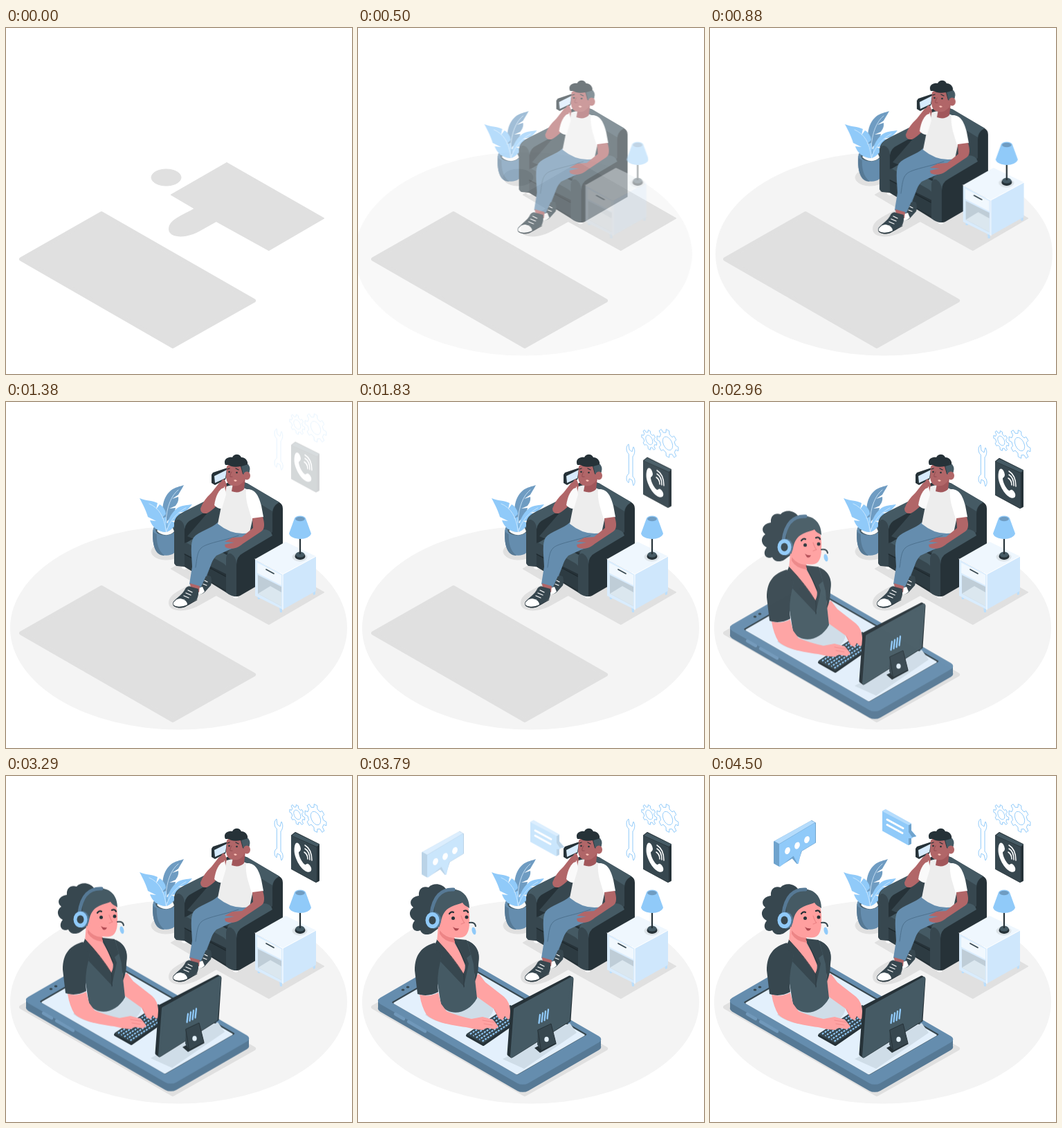
Write an HTML page that moves like this. It is 500 px wide and 500 px high and loops after 4.54 s.

```html
<!DOCTYPE html>
<html lang="en">
<head>
<meta charset="utf-8">
<title>Remote support</title>
<style>
html,body{margin:0;width:100%;height:100%;overflow:hidden;background:#fff}
svg{display:block;width:100vw;height:100vh}
.room,.signs,.agent,.chat{animation:4540ms infinite both}
.room{animation-name:room}
.signs{animation-name:signs}
.agent{animation-name:agent}
.chat{animation-name:chat}
.hold{animation:hold 4540ms step-end infinite}
@keyframes hold{0%{opacity:0}2.8%,100%{opacity:1}}
@keyframes room{
0%{opacity:0;transform:translateX(-30px);animation-timing-function:cubic-bezier(.36,-.01,.5,1.38)}
24.34%,100%{opacity:1;transform:none}}
@keyframes signs{
0%,24.34%{opacity:0;transform:translateY(-30px);animation-timing-function:cubic-bezier(.36,-.01,.5,1.38)}
49.3%,100%{opacity:1;transform:none}}
@keyframes agent{
0%,49.2%{opacity:0;transform:translateY(30px);animation-timing-function:cubic-bezier(.36,-.01,.5,1.38)}
74.2%,100%{opacity:1;transform:none}}
@keyframes chat{
0%,74.2%{opacity:0;transform:translateY(30px);animation-timing-function:cubic-bezier(.36,-.01,.5,1.38)}
99.2%,100%{opacity:1;transform:none}}
.ln{fill:none;stroke-linecap:round;stroke-linejoin:round}
.rd{stroke-linejoin:round}
</style>
</head>
<body>
<svg viewBox="0 0 500 500">
<g class="hold"><g class="room"><ellipse cx="249.5" cy="326.5" rx="243.5" ry="147" fill="#f4f4f4"/></g></g>

<!-- floor shadows -->
<g fill="#e0e0e0" stroke="#e0e0e0" class="rd">
<path stroke-width="6" d="M22 334 138 268 358 394 241 460Z"/>
<path stroke-width="2" d="M319 195 459 275 380 321 304 279 279 293C267 300 252 302 243 299 234 296 234 287 241 280 250 272 262 268 273 261L239 241Z"/>
<ellipse cx="231.5" cy="216" rx="21.500" ry="12"/>
</g>

<g class="hold"><g class="room">
<!-- plant -->
<path d="M212.5 185C211 201 214 213 219 218 225 223 238 223 243 218 248 212 249 199 248 185Z" fill="#658dae"/>
<path d="M212.5 185C211 201 214 213 219 218 222 221 226 222 229 222 219 214 217 201 218 188Z" fill="#567995"/>
<ellipse cx="230.300" cy="184.500" rx="17.800" ry="9.500" fill="#658dae"/>
<ellipse cx="230.300" cy="185" rx="14" ry="7.500" fill="#455a64"/>
<path d="M218 186 224 182 241 182 243 187C238 194 224 194 218 186Z" fill="#fafafa"/>
<path d="M230 186C223 160 225 139 238 128 244 123 252 122 257 120 254 126 251 130 249 134L240 140 249 137C250 143 247 147 245 150L236 154 245 153C244 160 239 167 233 172Z" fill="#6f9cc2"/>
<path d="M232 188C232 174 237 161 248 153 254 149 262 149 269 148 265 153 262 156 259 158L249 160 257 162C255 167 250 170 247 171L239 172 245 175C243 181 238 186 232 188Z" fill="#90caf9"/>
<path d="M231 188C219 188 211 180 208 171L217 172 205 166C203 159 199 150 193 139 202 143 211 142 219 146L217 155 222 148C228 151 231 158 231 162L225 168 231 166C233 174 233 182 231 188Z" fill="#90caf9"/>
<path class="ln" d="M231 186C229 166 221 153 207 147M231 174C232 151 239 135 249 127M232 186C237 171 248 159 260 153" stroke="#d7ecfe" stroke-width=".8"/>

<!-- armchair -->
<path d="M254 237h7v4q-4 2-7-1ZM328 277h7v6q-4 2-7-1Z" fill="#fafafa"/>
<path d="M243 178C243 168 248 163 257 159L301 137 318 118C325 113 339 113 347 117L395 145Q400 148 400 154V244L338 280Q332 283 321 277L258 238 247 237Q243 235 243 231Z" fill="#263238"/>
<path d="M313 135C315 117 334 112 347 117L395 145C388 148 385 155 385 164V188L330 222 262 194Z" fill="#37474f"/>
<path d="M348 117 395 145C389 148 386 152 385 158L344 133C335 128 330 119 348 117Z" fill="#455a64"/>
<path d="M244 174C246 165 251 162 258 158L306 134 313 145 270 169Q259 174 258 184Z" fill="#455a64"/>
<path d="M243 178Q244 169 250 170 258 173 258 184V237L247 237Q243 235 243 231Z" fill="#37474f"/>
<path d="M258 205 273 196 332 228 319 238 262 209Z" fill="#455a64"/>
<path d="M258 205Q258 202 262 204L314 233Q319 236 319 241V249L258 219Z" fill="#37474f"/>
<path d="M258 219 318 253V272L258 238Z" fill="#2d3b42"/>
<path class="ln" d="M258 220 317 252" stroke="#1c262b"/>
<path d="M319 226Q319 214 329 210L371 184Q383 184 385 193L343 218Q333 223 333 235Z" fill="#455a64"/>
<path d="M318 226Q319 217 325 219 333 224 333 234V281Q325 281 318 275Z" fill="#37474f"/>

<!-- seated man -->
<path d="M277 271 287 249 296 252Q298 259 296 265L287 275Q281 280 276 276Z" fill="#37474f"/>
<path d="M277 269 284 267 287 274Q281 280 276 277Z" fill="#fff"/>
<path class="ln" d="M285 263 290 265M287 258 291 260" stroke="#fff" stroke-width="1.200"/>
<path d="M309 182 350 190C350 204 333 211 313 216L301 222 290 252 278 249C282 225 284 214 294 205Z" fill="#567995"/>
<path d="M306 174 350 188Q348 205 328 211L304 222Q298 228 295 238L282 267Q273 269 265 263L269 238C268 219 266 204 271 196 278 187 297 183 306 174Z" fill="#658dae"/>
<path class="ln" d="M336 193C313 201 289 204 282 211 276 217 276 227 274 239" stroke="#4d718e"/>
<path d="M266 262 280 266 279 275 267 270Z" fill="#b16668"/>
<path d="M241 291C242 285 252 282 258 272 260 267 264 265 267 267L278 270Q279 278 276 285C269 290 261 296 254 297 247 298 241 296 241 291Z" fill="#37474f"/>
<path d="M242 290Q246 284 252 284 262 286 262 293 253 297 245 295 241 294 242 290Z" fill="#fff"/>
<path class="ln" d="M257 280 264 283M260 276 267 279M263 272 269 275" stroke="#fff" stroke-width="1.300"/>
<path class="ln" d="M242 294Q249 299 258 296L276 286" stroke="#263238"/>
<path d="M310 124 331 119 348 126C356 126 362 132 364 144L357 166 352 189Q328 194 306 176L311 151Z" fill="#ededed"/>
<path d="M316 112 319 120 317 130 305 149Q298 157 290 161 281 162 281 154 285 142 297 131L308 117Z" fill="#b16668"/>
<path d="M316 122C307 127 303 136 301 149Q306 155 312 154L318 134Z" fill="#fafafa"/>
<path d="M347 126C360 125 365 135 369 150L372 166Q365 171 355 169L349 149Q346 137 347 126Z" fill="#fff"/>
<path d="M356 168 371 166Q376 182 369 187L342 205C335 211 327 214 317 210L316 206 330 203 316 202 327 196 341 195 357 182Z" fill="#b16668"/>
<path d="M329 112 346 109 344 126Q337 133 326 129Z" fill="#a2575b"/>
<path d="M297 105 299 102 320 95Q323 97 320 104L317 112 302 120 297 117Z" fill="#263238"/>
<path d="M301 107 319 98 317 110 302 117Z" fill="#d7ebfd"/>
<path d="M319 93Q326 86 339 88L347 96 344 114Q337 123 328 121 319 120 318 109Z" fill="#b16668"/>
<path d="M317 91C313 83 321 79 327 80 330 74 338 75 340 80 348 80 350 88 349 90 355 97 351 104 347 106L342 104 339 93Q327 95 322 91Z" fill="#263238"/>
<path d="M340 93 350 90Q355 97 350 104L343 105Z" fill="#455a64"/>
<ellipse cx="348" cy="106.500" rx="5" ry="6" fill="#b16668"/>
<path class="ln" d="M326 101Q323 106 324 108L327 108" stroke="#914b50"/>
<path class="ln" d="M320 97 323 96M332 96 336 98" stroke="#263238" stroke-width="1.300"/>
<path d="M329 113Q332 111 334 114L331 115Z" fill="#ffc2b8"/>
<circle cx="322.500" cy="101" r="1.300" fill="#263238"/><circle cx="333.500" cy="102" r="1.300" fill="#263238"/>
<path d="M308 126 311 115Q314 109 316 113L315 124Z" fill="#b16668"/>

<g class="room">
<g class="room">
<!-- side table -->
<path d="M363 278h4v7h-3ZM395 296h4v8h-3ZM443 272h4v6l-3 1Z" fill="#bbdefb"/>
<path d="M360 227 404 202 448 223 400 249Z" fill="#eff7fe"/>
<path d="M360 227 400 249V300L360 280Z" fill="#d9ecfd"/>
<path d="M448 223 400 249V300L448 273Z" fill="#cfe7fc"/>
<path d="M363 232 398 250V265L363 247Z" fill="#f1f8fe"/>
<path d="M364 250 398 267V295L364 277Z" fill="#bfcdd7"/>
<path d="M364 277 382 266 398 275V295Z" fill="#dbe7ef"/>
<path class="ln" d="M376 242 387 248" stroke="#37474f" stroke-width="1.700"/>
<path class="ln" d="M360 227 400 249 448 223M400 249V300" stroke="#fff"/>
</g>
<!-- lamp -->
<ellipse cx="424.500" cy="224" rx="11" ry="6.500" fill="#dce3e8"/>
<ellipse cx="425" cy="223" rx="7.500" ry="5" fill="#263238"/>
<ellipse cx="425" cy="220.500" rx="6.500" ry="4" fill="#455a64"/>
<path d="M425 193V220" stroke="#263238" stroke-width="2.200"/>
<path d="M417 168 409 190C411 200 438 201 441 190L433 168Z" fill="#90caf9"/>
<ellipse cx="425" cy="168.500" rx="8" ry="4" fill="#90caf9"/>
<ellipse cx="425" cy="169" rx="6.800" ry="3.200" fill="#6f9cc2"/>
</g>
</g></g>

<!-- service icons -->
<g class="signs">
<g id="gears" class="ln" stroke="#90caf9"></g>
<path class="ln" stroke="#90caf9" d="M391 76C387 73 387 65 391 62L392 70 396 73 398 66C401 70 400 77 397 80V109C401 112 401 119 398 122L396 114 392 112 391 118C387 115 387 107 391 105Z"/>
<path class="rd" d="M413 86 418 82 452 99V151L448 153 413 134Z" fill="#263238" stroke="#263238" stroke-width="2"/>
<path d="M413 86 418 82 453 99 449 102Z" fill="#455a64"/>
<path d="M412 86 449 103V154L412 134Z" fill="#37474f"/>
<path d="M419 97C422 95 425 99 426 105 426 109 423 109 423 111 424 119 429 126 432 128 434 128 435 125 438 128 442 132 442 136 440 138 434 142 421 130 417 112 416 105 417 99 419 97Z" fill="#fff"/>
<path class="ln" d="M431 110Q436 113 436 120M432 105Q439 109 439 121M432 100Q442 106 442 122" stroke="#fff" stroke-width="1.500"/>
</g>

<!-- agent on the phone screen -->
<g class="agent">
<g id="phone"></g>
<path class="ln" d="M54 344 66 351M73 355 97 369" stroke="#7098ba" stroke-width="4.500"/>
<ellipse cx="65" cy="309" rx="2.300" ry="1.600" fill="#37474f"/><ellipse cx="72" cy="305" rx="2.300" ry="1.600" fill="#37474f"/>
<path d="M97 345C122 325 149 317 180 314 200 321 201 340 186 352 160 365 115 361 97 345ZM209 409 306 357 316 371 240 423Z" fill="#cfdde8"/>
<!-- keyboard -->
<path class="rd" d="M158 375 220 334 240 347 181 388Z" fill="#263238" stroke="#263238" stroke-width="4"/>
<path class="rd" d="M158 373 220 332 240 345 181 385Z" fill="#37474f" stroke="#37474f" stroke-width="2"/>
<g id="keys" class="ln" stroke="#90caf9" stroke-width="2.100" stroke-dasharray="2.800 1.700" style="stroke-linecap:butt"></g>
<!-- far arm -->
<path d="M165 291 175 286 184 298 211 319Q219 326 220 339L222 348 217 352 212 347 209 353 203 350 197 337 169 317Z" fill="#ffa3a3"/>
<path class="ln" d="M197 337 203 349" stroke="#ed8586"/>
<!-- ponytail -->
<path d="M127 163C121 155 108 154 102 161 93 158 87 164 88 173 77 174 72 184 80 190 72 195 74 205 82 209 75 217 80 227 90 223 92 229 100 231 107 227L130 210Z" fill="#37474f"/>
<!-- torso -->
<path d="M114 239 139 236 158 238C171 243 177 255 174 268L168 284 172 321C159 345 132 348 120 331L115 300 108 248Z" fill="#455a64"/>
<path d="M111 241C93 246 82 257 82 281L86 315Q101 320 116 312 113 292 119 268L121 258Z" fill="#37474f"/>
<path d="M158 238C171 243 177 255 174 272Q174 286 169 297L167 272Z" fill="#37474f"/>
<path d="M116 216 139 231V240L155 269 154 289Q137 262 114 240Z" fill="#ffa3a3"/>
<path d="M118 223Q128 235 140 234L140 241Q124 239 118 228Z" fill="#ed8586"/>
<path d="M114 237 109 249 121 258 119 268 154 305 152 286Q136 260 114 237ZM139 235 157 237 163 258 157 263 160 271 153 304 152 286 156 276Z" fill="#37474f"/>
<path class="ln" d="M114 237Q139 263 153 287L153 305M139 236 155 270" stroke="#263238" stroke-width=".8"/>
<!-- near arm -->
<path d="M89 316Q103 320 116 313L120 329 128 340Q145 347 164 351L180 348 195 352 203 362 198 366 186 364 180 367Q167 366 156 363C132 360 109 355 99 345Q92 334 89 316Z" fill="#ffa3a3"/>
<path class="ln" d="M182 358 194 360M180 353 198 356" stroke="#ed8586" stroke-width=".8"/>
<!-- head -->
<path d="M118 191Q132 177 157 181 162 195 161 211 161 230 151 233 130 236 118 222Z" fill="#ff9f9f"/>
<path d="M113 211C106 183 114 166 130 164 149 161 161 173 161 191 157 188 153 187 151 183 139 188 124 188 120 210L117 219Z" fill="#455a64"/>
<path d="M106 199C109 174 121 163 138 164" class="ln" stroke="#567995" stroke-width="5"/>
<ellipse cx="110" cy="208.500" rx="10" ry="12" fill="#567995"/>
<ellipse cx="107.500" cy="208.500" rx="10" ry="11.500" fill="#90caf9"/>
<ellipse cx="107.500" cy="208.500" rx="5" ry="6" fill="#37474f"/>
<path class="ln" d="M161 212Q169 211 170 217" stroke="#37474f" stroke-width="2"/>
<ellipse cx="167.500" cy="224" rx="2.800" ry="5.500" transform="rotate(-15 167 224)" fill="#90caf9"/>
<path class="ln" d="M132 199Q135 195 138 197M153 195Q157 193 159 197" stroke="#263238" stroke-width="2.200"/>
<circle cx="137.500" cy="205.500" r="2.500" fill="#263238"/><circle cx="157" cy="204" r="2.500" fill="#263238"/>
<path class="ln" d="M149 202Q152 211 154 212L149 214" stroke="#ed8586" stroke-width="1.200"/>
<path d="M137 218Q141 221 146 220 144 225 140 223Z" fill="#b04a52"/>
<!-- monitor -->
<path class="rd" d="M223 334 306 291 309 293 305 353 222 405 218 402Z" fill="#263238" stroke="#263238" stroke-width="5"/>
<path class="rd" d="M227 337 309 292 304 353 222 405Z" fill="#455a64" stroke="#455a64" stroke-width="4"/>
<path class="ln" d="M263 345 261.500 357M267 342.500 265.500 355M271 340 269.500 353M275 337.500 273.500 350.500" stroke="#90caf9" stroke-width="2.300"/>
<path d="M255 393 280 380 287 387 263 400Z" fill="#263238"/>
<path d="M260 367 279 358 286 386 265 397 259 388Z" fill="#37474f"/>
<path class="ln" d="M260 367 279 358 286 386 265 397Z" stroke="#263238"/>
<ellipse cx="272.500" cy="380.500" rx="3.200" ry="3.800" fill="#e3f0fc"/>
</g>

<!-- speech bubbles -->
<g class="chat">
<path class="rd" d="M93 95 147 65 152 68V96L132 108 126 126 119 118 100 130 93 126Z" fill="#6fa3cd" stroke="#6fa3cd" stroke-width="2"/>
<path d="M93 94 146 64.500 152 67 100 98Z" fill="#b5dcfc"/>
<path class="rd" d="M101 99 151 69V96L131 108 127 126 121 114 101 130Z" fill="#90caf9" stroke="#90caf9" stroke-width="2"/>
<g fill="#fff"><ellipse cx="112" cy="108" rx="3.600" ry="5.300" transform="rotate(22 112 108)"/><ellipse cx="126" cy="100.500" rx="3.600" ry="5.300" transform="rotate(22 126 100.500)"/><ellipse cx="140" cy="92" rx="3.600" ry="5.300" transform="rotate(22 140 92)"/></g>
<path class="rd" d="M250 51 254 49 290 69V79L297 87 290 88V97L286 99 250 79Z" fill="#b5dcfc" stroke="#b5dcfc" stroke-width="2"/>
<path d="M287 71 291 69V79L298 87 291 89V98L287 100Z" fill="#6fa3cd"/>
<path d="M249 51 287 71V81L293 90 287 90V100L249 79Z" fill="#90caf9"/>
<path class="ln" d="M256 63 279 75.500M256 70.500 278 82.500" stroke="#fff" stroke-width="3"/>
</g>
</svg>
<script>
const add = (id, markup) => document.getElementById(id).insertAdjacentHTML('beforeend', markup);

// Cog outline seen on the tilted wall plane
function gear(cx, cy, r, teeth) {
  const at = (a, k) => `${(cx + .8 * k * Math.cos(a)).toFixed(1)} ${(cy + .42 * k * Math.cos(a) + k * Math.sin(a)).toFixed(1)}`;
  const pts = [];
  for (let i = 0; i < teeth; i++) {
    [[-.27, .76], [-.18, 1], [.18, 1], [.27, .76]].forEach(([o, k]) =>
      pts.push(at((i + o) / teeth * 2 * Math.PI, r * k)));
  }
  const hole = Array.from({length: 30}, (_, i) => at(i * Math.PI / 15, r * .46));
  add('gears', `<path d="M${pts.join('L')}ZM${hole.join('L')}Z"/>`);
}
gear(447.5, 61, 19.4, 8);
gear(420.8, 56, 13.7, 8);

// Rounded rectangle lying on the floor, placed by its far corner
const slab = (x, y, w, h, r, fill) => add('phone',
  `<rect width="${w}" height="${h}" rx="${r}" fill="${fill}" transform="matrix(.866 .5 -.866 .5 ${x} ${y})"/>`);
slab(142, 268, 247, 136, 9, '#567995');
add('phone', '<path d="M29 325V336L351 392V381Z" fill="#567995"/>');
slab(142, 257, 247, 136, 9, '#658dae');
slab(149.5, 268.5, 210, 117, 2, '#37474f');
slab(149.5, 271, 207, 114.5, 2, '#e3f0fc');

for (let i = 0; i < 5; i++) {
  const x = 162 + i * 4.4, y = 373 + i * 2.6;
  add('keys', `<path d="M${x} ${y}l57-37.5" stroke-dashoffset="${i % 2 * 1.5}"/>`);
}
</script>
</body>
</html>
```
